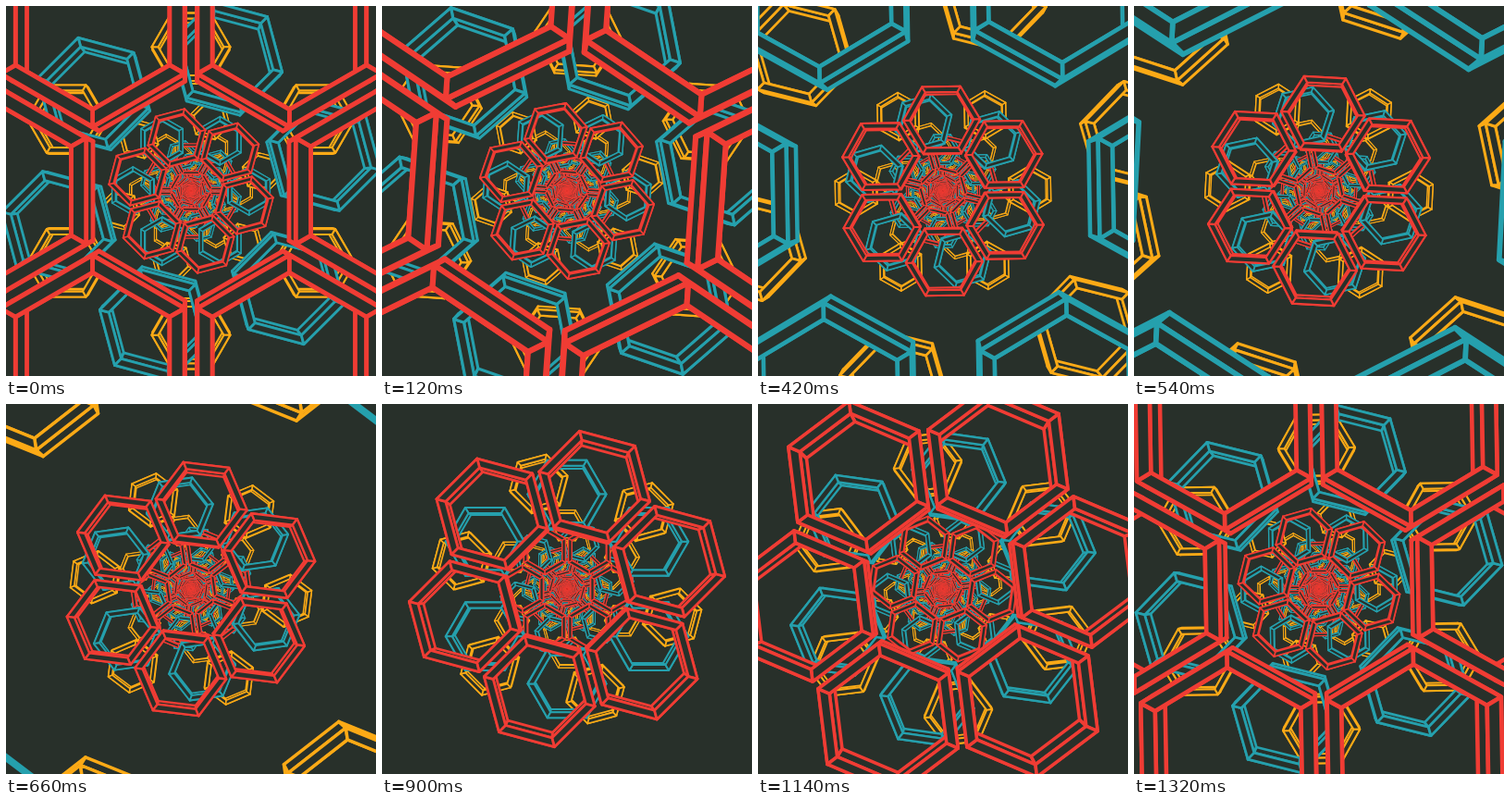
Recreate the animation shown at these times as an HTML page with a canvas. Size 400 by 400 pixels, loop 1350 ms.

```html
<!DOCTYPE html>
<html lang="en">
<head>
<meta charset="utf-8">
<title>Hexagon tunnel</title>
<style>
  html, body { margin: 0; width: 100%; height: 100%; overflow: hidden; background: #28302a; }
  canvas { display: block; width: 400px; height: 400px; }
</style>
</head>
<body>
<canvas id="stage" width="400" height="400"></canvas>
<script>
const ctx = document.getElementById('stage').getContext('2d');

const LOOP = 1350, STEP = 30;
const BACK = '#28302a';
const NEAREST = 0.39;           // depth of the first ring when the loop starts
const RING_COUNT = 105;
const TWIST = Math.PI / 4;      // turn per unit of depth
const THICKNESS = 0.027;        // depth of each hexagonal frame
const OUTER = 38.8 * 2 / Math.sqrt(3);
const INNER = 32.5 * 2 / Math.sqrt(3);
const RINGS = [
  { color: '#f03c34', distance: 83 },
  { color: '#25a0ad', distance: 108.3 },
  { color: '#fcaa16', distance: 164.5 }
];

// Corners of a hexagon above the centre, in perspective.
function hexagon(radius, distance, depth) {
  return Array.from({ length: 6 }, (_, i) => {
    const angle = Math.PI / 6 + i * Math.PI / 3;
    return [radius * Math.sin(angle) / depth, -(distance + radius * Math.cos(angle)) / depth];
  });
}

function addPolygon(path, points) {
  points.forEach(([x, y], i) => i ? path.lineTo(x, y) : path.moveTo(x, y));
  path.closePath();
}

// One quad for each pair of matching edges.
function band(from, to) {
  return from.map((point, i) => {
    const next = (i + 1) % 6, quad = new Path2D();
    addPolygon(quad, [point, from[next], to[next], to[i]]);
    return quad;
  });
}

function buildFrame(distance, depth) {
  const far = depth + THICKNESS;
  const outer = hexagon(OUTER, distance, depth);
  const inner = hexagon(INNER, distance, depth);
  return [
    ...band(outer, hexagon(OUTER, distance, far)),
    ...band(inner, hexagon(INNER, distance, far)),
    ...band(outer, inner)
  ];
}

function drawRing({ color, distance }, depth) {
  const quads = buildFrame(distance, depth);
  ctx.save();
  ctx.translate(200, 200);
  ctx.rotate(Math.PI / 6 - TWIST * (depth - NEAREST));
  ctx.lineWidth = 1.7 / depth + 0.45;
  ctx.lineJoin = 'round';
  ctx.strokeStyle = color;
  ctx.fillStyle = BACK;
  for (let i = 0; i < 6; i++) {
    for (const quad of quads) {
      ctx.fill(quad);
      ctx.stroke(quad);
    }
    ctx.rotate(Math.PI / 3);
  }
  ctx.restore();
}

function draw(time) {
  const progress = Math.floor((time % LOOP) / STEP) * STEP / LOOP;
  ctx.fillStyle = BACK;
  ctx.fillRect(0, 0, 400, 400);
  // Far rings first, so that nearer walls cover them.
  for (let i = RING_COUNT - 1; i >= 0; i--) {
    const depth = NEAREST + i / 3 - progress;
    if (depth > 0.1) drawRing(RINGS[i % 3], depth);
  }
}

let start;
function tick(now) {
  start ??= now;
  draw(now - start);
  requestAnimationFrame(tick);
}
draw(0);
requestAnimationFrame(tick);
</script>
</body>
</html>
```
